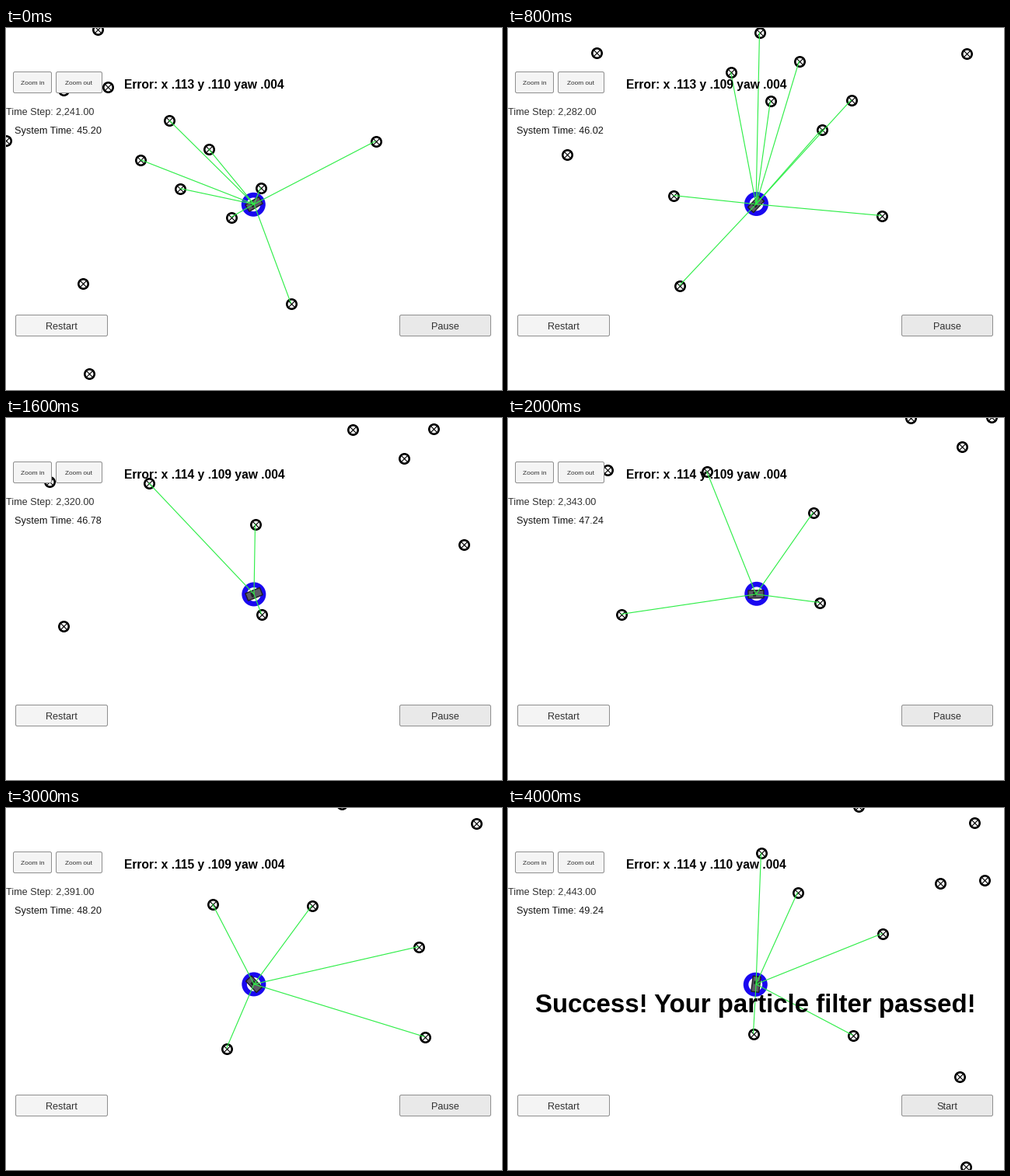
A matplotlib script that plays this animation: 638x466 px, repeating every 7.6 s.

```python
import numpy as np
import matplotlib.pyplot as plt
from matplotlib.animation import FuncAnimation
from matplotlib.collections import LineCollection
from matplotlib.patches import Circle, FancyBboxPatch, Rectangle
from matplotlib.transforms import Affine2D
from numpy.polynomial import polynomial as poly

W, H, DPI = 638, 466, 64
FRAMES, INTERVAL, LAST = 38, 200, 20
CENTER = np.array([319, 226.8])
SENSOR_RANGE = 235
START_STEP, START_TIME, DT = 2241, 45.2, 0.02
PX = 72 / DPI  # points per pixel

plt.rcParams["font.family"] = "Liberation Sans"

# Map: a square of four landmarks plus the scattered ones
quarter = np.radians(81 + 90 * np.arange(4))
square = np.column_stack([217 + 45 * np.cos(quarter),
                          163 + 45 * np.sin(quarter)])
scattered = [
    (118, 2), (131, 76), (74, 80), (0, 145), (328, 206), (290, 244),
    (476, 146), (367, 355), (99, 329), (107, 445), (-38, 276), (-166, 274),
    (-148, 460), (-109, 92), (-156, 41), (-31, -19),
]
LANDMARKS = np.round(np.vstack([square, scattered])) - 0.5

# Key points of the drive: tick, steps done, scroll of the map
KEYS = np.array([
    (0, 0, 0, 0), (4, 41, 114, -112.6), (6, 64, 177, -168),
    (10, 102, 294, -207), (13, 134, 392, -182), (17, 173, 472, -83),
    (20, 202, 482, 17.4),
])


def pace(tick):
    """Even progress, with a double-length tick every 3.5 ticks."""
    return tick + np.floor((tick + 1.5) / 3.5)


ticks = np.arange(LAST + 1)
steps = np.round(np.interp(pace(ticks), pace(KEYS[:, 0]), KEYS[:, 1]))

# One smooth curve through the key points; the car drives against the scroll
span = KEYS[-1, 1]
curve = poly.polyfit(KEYS[:, 1] / span, KEYS[:, 2:], len(KEYS) - 1)
scroll = np.round(poly.polyval(steps / span, curve)).T
vx, vy = -poly.polyval(steps / span, poly.polyder(curve))
heading = np.arctan2(vy, vx)

fig = plt.figure(figsize=(W / DPI, H / DPI), dpi=DPI, facecolor="white")
ax = fig.add_axes([0, 0, 1, 1])
ax.set_xlim(0, W)
ax.set_ylim(H, 0)
ax.axis("off")


def label(x, y, text, size, color="black", **kw):
    return ax.text(x, y, text, fontsize=size * PX, color=color, zorder=12, **kw)


def button(x0, y0, x1, y1, text, size, fill="#f4f4f4"):
    ax.add_patch(FancyBboxPatch(
        (x0 + 0.5, y0 + 0.5), x1 - x0 - 1, y1 - y0 - 1,
        boxstyle="round,pad=0,rounding_size=2",
        fc=fill, ec="#8f8f8f", lw=PX, zorder=10))
    base = (y0 + y1) / 2 + size * 0.36
    return label((x0 + x1) / 2, base, text, size, "#323232", ha="center")


def markers(shape, size, width):
    return ax.plot([], [], ls="", marker=shape, ms=size * PX, mew=width * PX,
                   mfc="none", mec="black", zorder=2)[0]


rings, crosses = markers("o", 12.4, 2.6), markers("x", 8, 1.1)

# Estimate ring, car and sensor beams
estimate = ax.add_patch(Circle(CENTER, 12.2, fc="white", ec="#1a08f0",
                               lw=6.6 * PX, zorder=4))
car = [ax.add_patch(Rectangle((-10, -5), 20, 10, fc="#5c5c66", ec="#1c1c24",
                              lw=1.4 * PX, zorder=5)),
       ax.add_patch(Rectangle((0, -3), 4, 6, fc="#24242c", zorder=5))]
beams = ax.add_collection(LineCollection([], colors="#2fee48",
                                         linewidths=1.15 * PX, zorder=6))

button(9, 56, 59, 84, "Zoom in", 8.4)
button(64, 56, 124, 84, "Zoom out", 8.2)
button(12, 369, 131, 397, "Restart", 12.6)
run_label = button(506, 369, 624, 397, "Pause", 12.6, "#e9e9e9")

step_text = label(-0.3, 111.7, "", 12.6, "#323232")
time_text = label(11, 135.6, "", 12.6, "#161616")
error_text = label(151.6, 77.8, "", 15.65, weight="bold")
success = label(318.5, 263.2, "Success! Your particle filter passed!", 33,
                weight="bold", ha="center")


def errors(i):
    x = 113.9 + 0.75 * np.cos(2 * np.pi * (i - 16.6) / 26)
    y = 109 + ((i - 8.5) / 11) ** 2
    return f"Error: x .{x:.0f} y .{y:.0f} yaw .004"


def update(frame):
    i = min(frame, LAST)
    pts = LANDMARKS + scroll[i]
    rings.set_data(*pts.T)
    crosses.set_data(*pts.T)

    near = pts[np.hypot(*(pts - CENTER).T) < SENSOR_RANGE]
    beams.set_segments([(CENTER, p) for p in near])

    wobble = np.cos(2 * np.pi * (i - 17) / 7)
    estimate.center = CENTER + wobble * np.array([0.8, -0.5])
    pose = Affine2D().rotate(heading[i]).translate(*CENTER)
    for part in car:
        part.set_transform(pose + ax.transData)

    step_text.set_text(f"Time Step: {START_STEP + steps[i]:,.2f}")
    time_text.set_text(f"System Time: {START_TIME + DT * steps[i]:.2f}")
    error_text.set_text(errors(i))

    done = i == LAST
    success.set_visible(done)
    run_label.set_text("Start" if done else "Pause")
    return []


anim = FuncAnimation(fig, update, frames=FRAMES, interval=INTERVAL,
                     init_func=lambda: update(0), repeat=True, repeat_delay=0)
plt.show()
```
